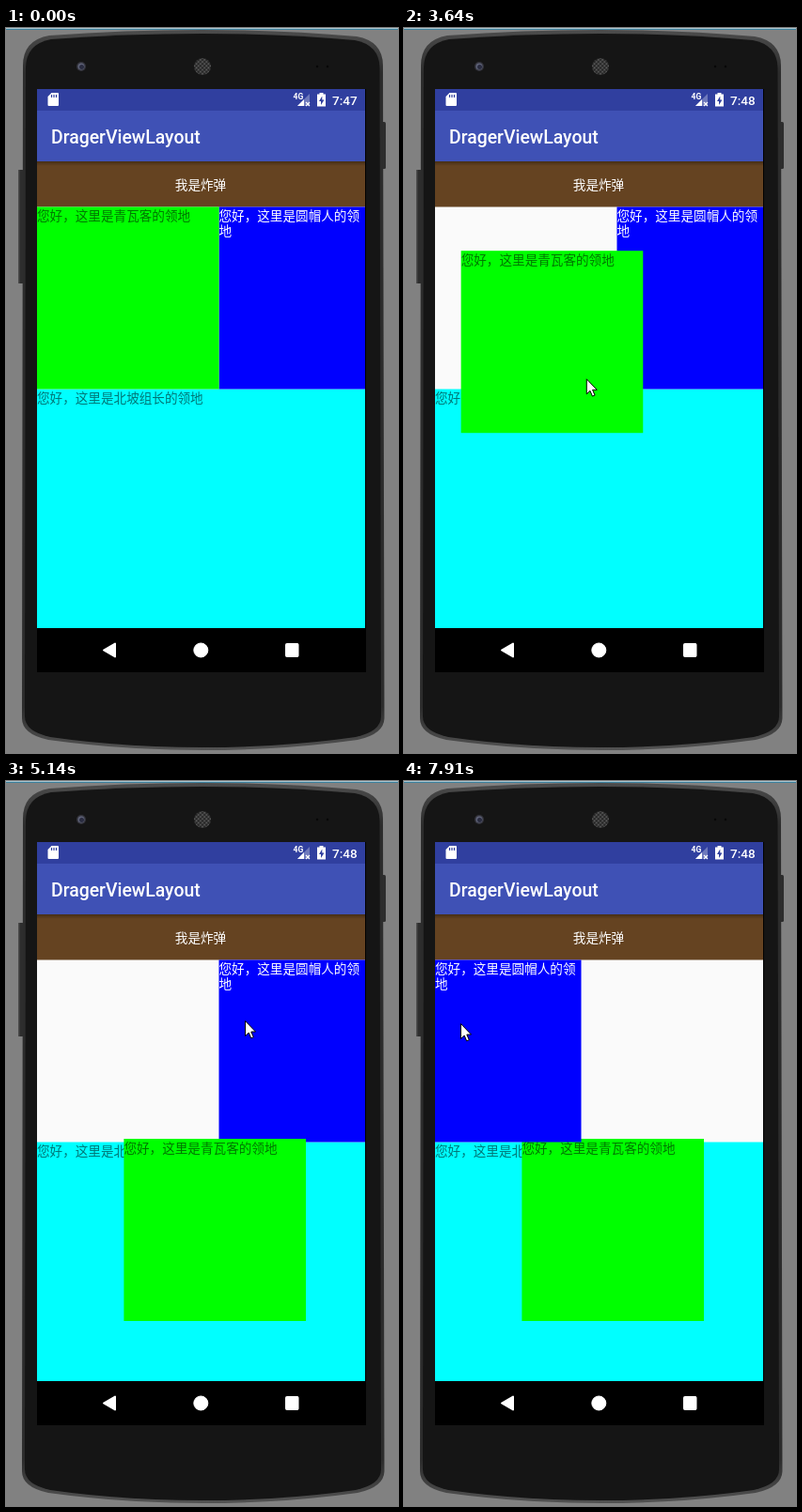
An HTML page that plays this animation: 417 px wide and 772 px high, repeating every 8 s.

```html
<!DOCTYPE html>
<html lang="zh-CN">
<head>
<meta charset="utf-8">
<title>DragerViewLayout</title>
<style>
  html, body { margin: 0; width: 100%; height: 100%; overflow: hidden; background: #818181; }
  svg { display: block; width: 417px; height: 772px; }
  text { font-family: Roboto, "Noto Sans CJK SC", "Noto Sans CJK", sans-serif; font-size: 13.6px; fill: #fff; }
  .cjk { font-family: "Noto Sans CJK SC", "Noto Sans CJK", sans-serif; }
  .dim { fill: #000; fill-opacity: .54; }
  .title { font-size: 19.4px; font-weight: 500; }
  .clock { font-weight: 500; }
  .net { font-size: 8.5px; font-weight: 700; }
</style>
</head>
<body>
<svg viewBox="0 0 417 772">
  <defs>
    <linearGradient id="shade" x2="0" y2="1">
      <stop offset="0" stop-opacity=".32"/>
      <stop offset="1" stop-opacity="0"/>
    </linearGradient>
    <linearGradient id="rim" x2="0" y2="1">
      <stop offset="0" stop-color="#4c4c4c"/>
      <stop offset=".06" stop-color="#2c2c2c"/>
      <stop offset=".94" stop-color="#2c2c2c"/>
      <stop offset="1" stop-color="#525252"/>
    </linearGradient>
    <pattern id="holes" width="3" height="3" patternUnits="userSpaceOnUse" patternTransform="rotate(45 209 41)">
      <circle cx="1.5" cy="1.5" r=".95" fill="#6c6c6c"/>
    </pattern>
  </defs>

  <rect width="417" height="772" fill="#818181"/>
  <rect width="417" height="1" fill="#a9c6d0"/>
  <rect y="1" width="417" height="1" fill="#3b7f9c"/>

  <!-- handset -->
  <rect x="13" y="151" width="6" height="121" rx="1.5" fill="#2d2d2d"/>
  <rect x="13" y="151" width="1.5" height="121" fill="#4a4a4a"/>
  <rect x="398" y="100" width="6" height="50" rx="1.5" fill="#2d2d2d"/>
  <path d="M18 40Q18 13 46 8Q125 2 209 2Q293 2 373 9Q401 14 401 40L402.500 735Q402 752 374 758Q295 769 209 769Q124 769 45 758Q17 752 17 735Z" fill="url(#rim)"/>
  <path d="M21 42Q21.500 17 48 12Q125 6 209 6Q293 6 371 13Q397 18 397.500 42L399 733Q399 749 372 755Q295 766 209 766Q124 766 47 755Q20 749 20 733Z" fill="#151515"/>
  <circle cx="80" cy="41" r="5" fill="#34343c"/>
  <circle cx="80" cy="41" r="3.500" fill="#5f6379"/>
  <circle cx="80.500" cy="41.500" r="2.500" fill="#2a2c40"/>
  <circle cx="209" cy="41" r="9" fill="#222"/>
  <circle cx="209" cy="41" r="9" fill="url(#holes)"/>
  <circle cx="331" cy="41" r="1.200" fill="#080808"/>
  <circle cx="342" cy="41" r="1.200" fill="#080808"/>

  <!-- screen -->
  <rect x="33" y="65" width="350" height="621" fill="#000"/>
  <rect x="33" y="65" width="349" height="574" fill="#fafafa"/>
  <rect x="33" y="65" width="349" height="23" fill="#303f9f"/>
  <rect x="33" y="88" width="349" height="54" fill="#3f51b5"/>
  <text class="title" x="48" y="122.700">DragerViewLayout</text>

  <!-- status icons -->
  <g fill="#fff">
    <path d="M48.500 69H55Q56 69 56 70V82Q56 83 55 83H45.500Q44.500 83 44.500 82V73Z"/>
    <path d="M48.500 71v3M51 71v3M53.500 71v3" stroke="#303f9f" stroke-width="1.200"/>
    <text class="net" x="305.500" y="76">4G</text>
    <path d="M323 70V83H310Z" opacity=".3"/>
    <path d="M317 76V83H310Z"/>
    <path d="M319 79l4 4m0-4l-4 4" stroke="#fff" stroke-width="1.200"/>
    <path d="M333.500 69h4v1.500h2.500V83.500h-9V70.500h2.500Z"/>
    <path d="M336.300 72.500L333 78h2v4l3.500-5.500h-2.200Z" fill="#303f9f"/>
  </g>
  <text class="clock" id="clock" x="347" y="81.700"></text>

  <rect x="33" y="142" width="349" height="48.500" fill="#654321"/>
  <rect x="33" y="142" width="349" height="5" fill="url(#shade)"/>
  <text class="cjk" x="207" y="172" text-anchor="middle">我是炸弹</text>

  <g transform="translate(33 384.500)">
    <rect width="349" height="254.500" fill="#0ff"/>
    <text class="cjk dim" y="14.500">您好，这里是北坡组长的领地</text>
  </g>
  <g id="panels">
    <g id="blue">
      <rect width="155.500" height="194" fill="#00f"/>
      <text class="cjk" y="14.500">您好，这里是圆帽人的领</text>
      <text class="cjk" y="30.500">地</text>
    </g>
    <g id="green">
      <rect width="193.600" height="194" fill="#0f0"/>
      <text class="cjk dim" y="14.500">您好，这里是青瓦客的领地</text>
    </g>
  </g>

  <!-- navigation -->
  <g fill="#fff" stroke="#fff" stroke-linejoin="round">
    <path d="M104 662.500L116 655.500V669.500Z" stroke-width="2"/>
    <circle cx="207.300" cy="662.500" r="7.500"/>
    <rect x="297.500" y="655.500" width="13.500" height="14" rx="1"/>
  </g>

  <path id="cursor" d="M.5.5V16.500L4.200 13L6.700 18.800L9.300 17.700L6.800 12H11.500Z" fill="#fff" stroke="#000"/>
</svg>

<script>
  const LOOP = 8000;
  const GRAB_BLUE = 5290;
  const MINUTE = 3480;
  const el = id => document.getElementById(id);

  // A move shows `count` evenly timed poses on a curve from a to b, bent towards c
  const move = (start, end, count, a, b, c = a.map((v, i) => (v + b[i]) / 2)) =>
    ({ start, end, count, a, b, c });

  const actors = {
    cursor: { rest: [-50, -50], moves: [
      move(580, 1000, 4, [312, 539], [190, 303], [140, 370]),
      move(1680, 2340, 6, [187, 302], [139, 278]),
      move(3330, 4300, 8, [146, 284], [231, 468], [246, 466]),
      move(4720, 5140, 4, [234, 455], [254, 255]),
      move(5290, 5710, 4, [242, 253], [123, 250]),
      move(5860, 6520, 6, [105, 252], [44, 257], [60, 257]),
      move(6920, 7070, 2, [52, 257], [60, 258])
    ] },
    green: { rest: [33, 190.5], moves: [
      move(3480, 4300, 7, [44, 206], [124, 379], [96, 301]),
      move(4450, 4450, 1, [125, 381], [125.4, 381])
    ] },
    blue: { rest: [226.5, 190.5], moves: [
      move(5290, 5710, 4, [225, 190], [121.5, 185.5], [190, 186]),
      move(5860, 6520, 6, [97, 188], [33, 192.5], [40, 193]),
      move(6920, 7070, 2, [33, 192], [33, 190.5])
    ] }
  };

  function pose({ rest, moves }, t) {
    const m = moves.findLast(m => m.start <= t);
    if (!m) return rest;
    const done = m.count === 1 || t >= m.end;
    const gaps = m.count - 1;
    const p = done ? 1 : Math.floor((t - m.start) / (m.end - m.start) * gaps) / gaps;
    const q = 1 - p;
    return m.a.map((v, i) => q * q * v + 2 * p * q * m.c[i] + p * p * m.b[i]);
  }

  function raise(id) {
    const panels = el("panels");
    if (panels.lastElementChild !== el(id)) panels.append(el(id));
  }

  function draw(t) {
    for (const id in actors) {
      el(id).setAttribute("transform", `translate(${pose(actors[id], t)})`);
    }
    raise(t < GRAB_BLUE ? "green" : "blue");
    el("clock").textContent = t < MINUTE ? "7:47" : "7:48";
  }

  const begin = performance.now();
  function tick() {
    draw((performance.now() - begin) % LOOP);
    requestAnimationFrame(tick);
  }
  tick();
</script>
</body>
</html>
```
